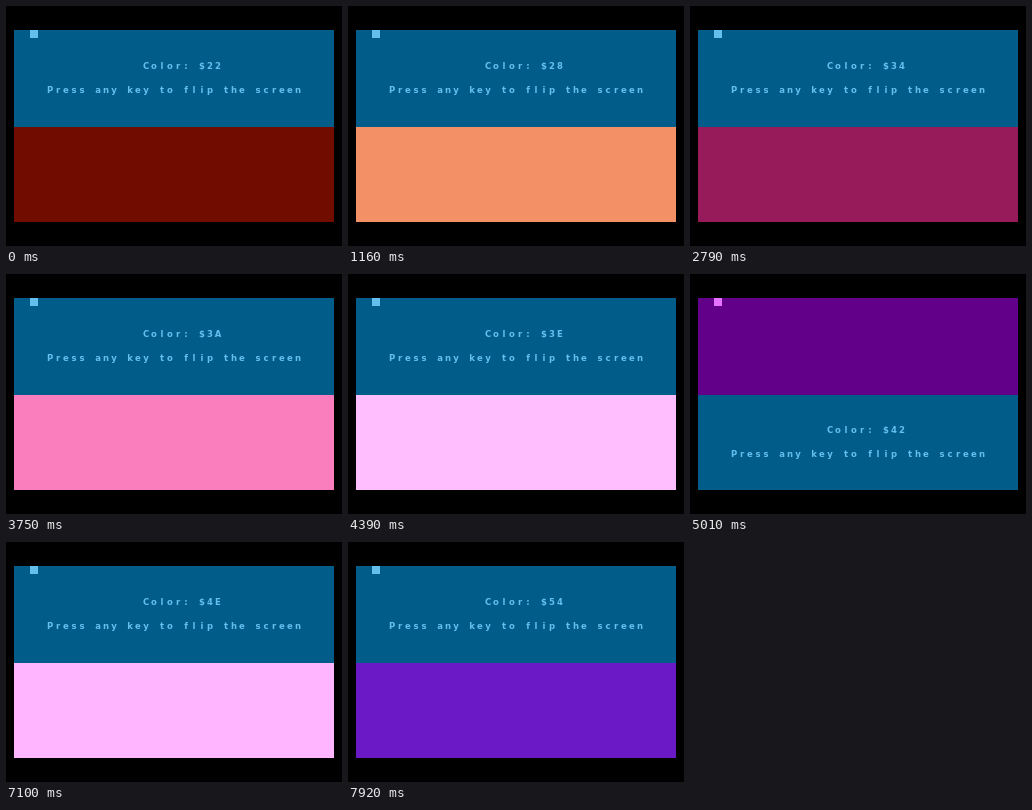
Recreate the animation shown at these times as an HTML page with a canvas. Size 336 px wide and 240 px high, loop 8000 ms.

```html
<!DOCTYPE html>
<html lang="en">
<head>
<meta charset="utf-8">
<title>Color flip</title>
<style>
html, body { margin: 0; width: 100%; height: 100%; overflow: hidden; background: #000; }
canvas { display: block; }
</style>
</head>
<body>
<canvas id="screen" width="336" height="240"></canvas>
<script>
const LOOP = 8000, FLIP = 4670, UNFLIP = 7100, LAG = 20;
const ctx = document.getElementById('screen').getContext('2d');

// Darkest RGB of each hue; luminance is added evenly and clipped.
const HUES = {
  2: [79, -21, -63],
  3: [85, -40, 24],
  4: [65, -50, 105],
  5: [41, -42, 133],
  9: [-64, 26, 72]
};

function rgb(value) {
  const light = (value & 15) * 16.5;
  const parts = HUES[value >> 4].map(c => Math.max(0, Math.min(255, Math.round(c + light))));
  return `rgb(${parts})`;
}

const stepStart = k => 200 + 320 * k + 10 * Math.floor((k + 7) / 12);

function valueAt(t) {
  let steps = 0;
  while (stepStart(steps) <= t) steps++;
  return 0x22 + 2 * steps;
}

function box(color, x, y, w, h) {
  ctx.fillStyle = rgb(color);
  ctx.fillRect(x, y, w, h);
}

// One character per 8-pixel cell.
function print(text, x, y) {
  [...text].forEach((ch, i) => ctx.fillText(ch, x + i * 8 + 4, y));
}

function draw(t) {
  const flipped = t >= FLIP && t < UNFLIP;
  const color = valueAt(t);
  const label = flipped ? color : valueAt(t - LAG);
  const top = flipped ? color : 0x94;
  const bottom = flipped ? 0x94 : color;
  const shift = flipped ? 96 : 0;

  ctx.fillStyle = '#000';
  ctx.fillRect(0, 0, 336, 240);
  box(top, 8, 24, 320, 97);
  box(bottom, 8, 121, 320, 95);
  box((top & 0xf0) | 10, 24, 24, 8, 8);

  ctx.font = 'bold 8.5px "DejaVu Sans", sans-serif';
  ctx.textAlign = 'center';
  ctx.fillStyle = rgb(0x9a);
  print('Color: $' + label.toString(16).toUpperCase(), 136, 63 + shift);
  print('Press any key to flip the screen', 40, 87 + shift);
}

function frame() {
  draw(performance.now() % LOOP);
  requestAnimationFrame(frame);
}
frame();
</script>
</body>
</html>
```
